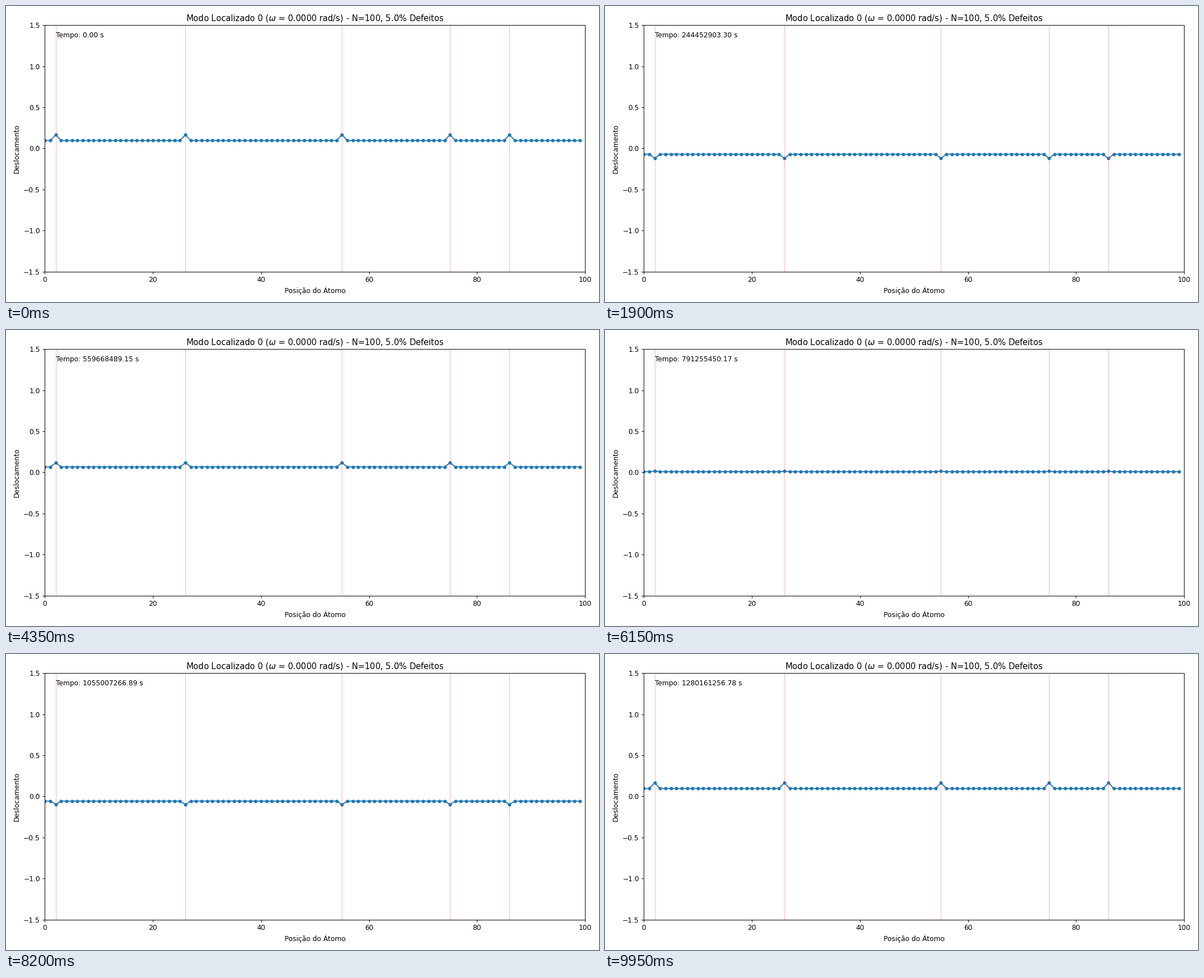
Animation of 1058 by 529 pixels, one loop 10 s. Source, as a matplotlib script:

```python
import numpy as np
import matplotlib.pyplot as plt
from matplotlib.animation import FuncAnimation

W, H = 1058, 529
DPI = W / 12
FRAMES = 200
PERIODS = 2
T_END = 1280161256.78

N = 100
DEFECTS = [2, 26, 55, 75, 86]
MASS_RATIO = 3

plt.rcParams["font.family"] = "DejaVu Sans"

# Mass-weighted uniform mode, normalised to unit length
mass = np.ones(N)
mass[DEFECTS] = MASS_RATIO
mode = np.sqrt(mass / mass.sum())

fig, ax = plt.subplots(figsize=(W / DPI, H / DPI), dpi=DPI)
line, = ax.plot(np.arange(N), mode, "o-", markersize=4)
for x in DEFECTS:
    ax.axvline(x, color="red", alpha=0.3, linewidth=0.8)
clock = ax.text(0.02, 0.95, "", transform=ax.transAxes)

ax.set_xlim(0, N)
ax.set_ylim(-1.5, 1.5)
ax.set_xlabel("Posição do Átomo")
ax.set_ylabel("Deslocamento")
ax.set_title(r"Modo Localizado 0 ($\omega$ = 0.0000 rad/s) - "
             f"N={N}, {len(DEFECTS) / N:.1%} Defeitos")
fig.tight_layout()


def update(i):
    u = i / (FRAMES - 1)
    line.set_ydata(mode * np.cos(2 * np.pi * PERIODS * u))
    clock.set_text(f"Tempo: {T_END * u:.2f} s")
    return line, clock


anim = FuncAnimation(fig, update, frames=FRAMES, interval=50,
                     repeat=True, repeat_delay=0)
plt.show()
```
